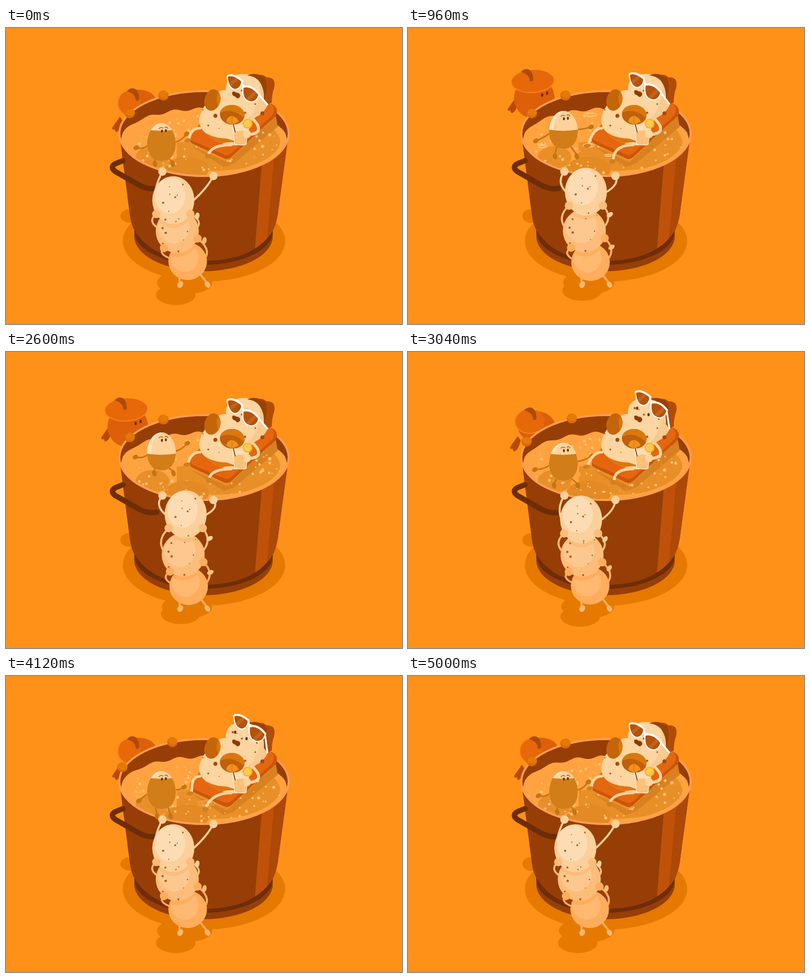
Write an HTML page with a canvas that moves like this. It is 800 px wide and 600 px high and loops after 5.04 s.

```html
<!DOCTYPE html>
<html lang="en">
<head>
<meta charset="utf-8">
<title>Soup spa</title>
<style>
html, body { margin: 0; height: 100%; overflow: hidden; background: #ff9118; }
canvas { display: block; width: 800px; height: 600px; }
</style>
</head>
<body>
<canvas id="stage" width="800" height="600"></canvas>
<script>
const c = document.getElementById('stage').getContext('2d');
const LOOP = 5040, STROKE = LOOP / 2, TAU = Math.PI * 2;
const BROWN = '#963e05', DARK = '#6e2d08', SHADE = '#e67a00', CREAM = '#fcd5a0';
c.lineCap = c.lineJoin = 'round';

const mix = (a, b, k) => a + (b - a) * k;
const ease = (t, from, to) => {
  const k = Math.min(1, Math.max(0, (t - from) / (to - from)));
  return k * k * (3 - 2 * k);
};
// Rises to 1 and falls back to 0
const pulse = (t, rise, top, fall, end) => ease(t, rise, top) - ease(t, fall, end);

function oval(x, y, rx, ry, color, turn = 0) {
  c.beginPath();
  c.ellipse(x, y, rx, ry, turn, 0, TAU);
  if (color) { c.fillStyle = color; c.fill(); }
}
const dot = (x, y, r, color) => oval(x, y, r, r, color);
function shape(d, color) {
  c.fillStyle = color;
  c.fill(new Path2D(d));
}
function line(d, color, width) {
  c.strokeStyle = color;
  c.lineWidth = width;
  c.stroke(new Path2D(d));
}
function within(d, draw) {
  c.save();
  c.clip(new Path2D(d));
  draw();
  c.restore();
}
function random(seed) {
  return () => (seed = seed * 16807 % 2147483647) / 2147483647;
}
function freckles(x, y, rx, ry, count, seed) {
  const rand = random(seed * 7919);
  for (let i = 0; i < count; i++) {
    const a = i * 2.4 + seed, r = .45 + .5 * rand();
    dot(x + rx * r * Math.cos(a), y + ry * r * Math.sin(a), 1 + 1.6 * rand() ** 2, '#b05a18');
  }
}

const rand = random(7);
const bubbles = Array.from({ length: 190 }, () => {
  const a = rand() * TAU, r = Math.sqrt(rand());
  return {
    x: 398 + 155 * r * Math.cos(a), y: 238 + 60 * r * Math.sin(a),
    size: 1 + 2.4 * rand(), phase: rand(), rate: 2 + Math.floor(rand() * 4)
  };
});

// Point on a paddling orbit; side is -1 for left and 1 for right
function paddle(x, y, side, r, swing) {
  return [x + side * r * Math.sin(swing), y - r * .9 * Math.cos(swing)];
}

function shadows(up) {
  oval(400, 432, 164, 82, SHADE);
  oval(251, 381, 20, 14, SHADE);
  oval(mix(361, 366, up), 516, mix(56, 51, up), 24, SHADE);
  oval(mix(343, 353, up), mix(541, 531, up), 40, 20.5, SHADE);
}

function pumpkin(t) {
  const up = pulse(t, 300, 720, 2800, 3200) + .25 * pulse(t, 300, 720, 720, 960);
  const sway = 9 * pulse(t, 960, 2600, 2850, 3200);
  const m = (a, b) => mix(a, b, up);
  c.save();
  c.translate(-sway, sway);
  c.save();
  c.translate(m(224, 211), m(196, 158));
  shape('M6 -16Q-4 -2 -10 7Q-8 12 -4 9Q-4 16 1 14Q8 10 12 -8Z', '#b84a08');
  c.restore();
  oval(m(268, 255), m(150, 142), m(36, 41), m(25, 42), '#dd5f0a');
  const lid = [m(249, 252), m(152, 108), m(23, 43), m(25, 23), m(0, -.06)];
  oval(...lid.slice(0, 4), '#e66808', lid[4]);
  c.strokeStyle = '#f8841c';
  c.lineWidth = 2;
  c.beginPath();
  c.ellipse(...lid, m(1.6, 0), m(4.6, Math.PI));
  c.stroke();
  c.translate(m(16, 0), m(39, 0));
  shape('M228 89Q235 81 244 84Q253 89 253 106Q249 111 246 107Q246 94 228 89Z', '#ae4a07');
  if (up > .6) {
    const open = Math.abs(t - 1720) > 80 ? 3.4 : .9;
    oval(271, 136, 2.4, open, DARK);
    oval(281, 132, 2.4, open, DARK);
  }
  c.restore();
}

function pot() {
  oval(399, 422, 140, 71, BROWN);
  oval(399, 412, 140, 68, DARK);
  const body = 'M229 214L250 378Q253 402 262 414Q300 472 399 472Q498 472 537 414Q545 402 549 378L571 214Z';
  shape(body, BROWN);
  within(body, () => {
    shape('M518 260L503 446H526L543 250Z', '#bf5208');
    shape('M543 250L526 446H600V200Z', '#ad4906');
  });
  line('M236 269L221 275Q209 282 221 291L268 318Q286 328 304 325', DARK, 11);
}

function ripple(x, y, width, k) {
  if (k <= 0 || k >= 1) return;
  c.globalAlpha = Math.min(1, 2 * (1 - k));
  c.strokeStyle = '#ffcf8c';
  c.lineWidth = 1.2;
  for (const w of [width, width * .6]) {
    oval(x, y, w * Math.sqrt(k), w * .32 * Math.sqrt(k));
    c.stroke();
  }
  c.globalAlpha = 1;
}

function soup(t, swing, limbs) {
  oval(400, 214, 171, 86, BROWN);
  within('M230 214A170 86 0 0 1 570 214A170 86 0 0 1 230 214Z', () => {
    c.beginPath();
    for (let x = 232; x <= 568; x += 4) {
      const arc = Math.sqrt(1 - ((x - 400) / 168) ** 2);
      const wave = x < 405 ? 3 * arc * Math.sin(x * .125 + 1.5 * Math.sin(swing)) : 0;
      c.lineTo(x, 226 - 62 * arc + wave);
    }
    c.lineTo(580, 310);
    c.lineTo(220, 310);
    c.fillStyle = '#ffa340';
    c.fill();
    shape('M345 232Q420 226 470 215L535 200Q560 222 552 240Q538 268 480 284Q410 298 345 276Z', '#e98f28');
    oval(296, 262, 34, 23, '#e98f28');
    oval(365, 286, 45, 25, '#e48a24');
    shape('M373 238L447 272L545 178L549 200L460 275L440 282Z', '#d98120');
    for (const b of bubbles) {
      const life = (t / LOOP * b.rate + b.phase) % 1;
      const r = b.size * Math.min(1, 2 * Math.sin(life * TAU));
      if (r > 0) dot(b.x, b.y - life * 4, r, '#ffc272');
    }
    limbs.forEach(([x, y], i) => ripple(x, y, 20, (t / STROKE % 1 - .2 - .04 * i) / .42));
  });
  c.strokeStyle = '#ff9d55';
  c.lineWidth = 4;
  oval(400, 214, 171, 86);
  c.stroke();
}

function pumpkinHands(t) {
  const out = pulse(t, 2840, 3150, 4450, 4900);
  for (const [x, y] of [[250 - 15 * out, 173 + 12 * out], [318 + 18 * out, 137 - 3 * out]]) {
    oval(x, y, 10.5, 10, '#e0680a');
    oval(x + 1, y - 2, 9.5, 7, '#e27a08');
  }
}

function egg(t, swing) {
  const top = 193 - 25 * pulse(t, 350, 760, 2760, 3200) - 5 * ease(t, 960, 2600) + 5 * ease(t, 2760, 3200);
  const x = 314, y = top + 38, limb = '#c57512';
  for (const side of [-1, 1]) {
    const [hx, hy] = paddle(x + 51 * side, y + 4 - 14 * side, side, 7, swing);
    const [fx, fy] = paddle(x + 5 + 18 * side, y + 50, side, 6, swing);
    line(`M${x + 26 * side} ${y + 3 - side * 3}Q${x + 38 * side} ${y + 8 - side * 8} ${hx} ${hy}`, limb, 3);
    line(`M${x + 13 * side} ${y + 32}L${fx} ${fy - 3}`, limb, 3);
    oval(hx, hy, 6, 4.5, limb, -.5);
    oval(fx, fy, 4.5, 6.5, limb, -.25);
  }
  within(`M${x} ${top}c18 0 29 22 29 42c0 22 -12 35 -29 35s-29 -13 -29 -35c0 -20 11 -42 29 -42Z`, () => {
    dot(x, y, 50, '#ffe6c6');
    oval(x + 8, top + 36, 29, 36, '#ffd29b');
    shape(`M270 203Q${x} 214 358 203V300H270Z`, '#d17d18');
  });
  oval(x + 1, top + 16, 2, 3, DARK);
  oval(x + 9, top + 15, 2, 3, DARK);
  line(`M${x - 5} ${top + 11}q4 -4 8 -1m4 -1q4 -3 6 2`, '#a85a10', 1.5);
}

function bather(t, feet) {
  const bob = -4 * pulse(t, 500, 960, 1720, 2600);
  const raised = pulse(t, 2650, 3100, 4400, 4850);

  // Lounger and hair
  shape('M372 222Q368 230 378 235L440 264Q448 268 456 261L545 178Q551 168 543 158L530 150Z', '#cb5508');
  shape('M390 196L372 218Q369 225 378 229L440 256Q448 260 456 253L538 177Q547 162 533 152L515 150Z', '#e4670f');
  shape('M500 96Q520 92 526 100Q546 99 542 120Q537 134 537 151L520 158Z', '#b14c07');

  const [[lx, ly], [rx, ry]] = feet;
  line(`M392 203Q374 203 ${lx + 2} ${ly - 6}`, CREAM, 5.5);
  line(`M455 237Q418 237 ${rx + 1} ${ry - 7}`, CREAM, 5.5);
  oval(lx - 1, ly - 2, 7, 4, '#d18020', -.2);
  oval(rx - 1, ry - 1, 6, 5, '#d18020', -.2);

  const body = 'M446 112Q450 98 470 94Q500 90 516 108Q523 122 521 146L528 157Q522 169 511 177Q497 184 492 194Q490 234 465 238Q425 238 399 209Q387 196 392 177Q398 157 412 147Q430 123 444 126Q444 118 446 112Z';
  shape(body, CREAM);
  within(body, () => {
    shape('M506 95Q518 118 511 146Q500 180 478 190L550 240V85Z', '#f8ca90');
    shape('M384 190Q400 223 446 224L472 233L450 250H380Z', '#de7510');
    shape('M425 240Q442 228 470 233L480 245Z', CREAM);
    freckles(455, 155, 68, 66, 16, 5);
  });
  shape('M487 96Q505 88 523 101Q531 118 521 149Q523 120 509 105Q500 97 487 96Z', '#9b4105');
  dot(423, 178, 4, '#a44a0b');
  dot(518, 173, 4, '#a44a0b');

  // Swimsuit
  oval(417, 146, 16, 22, '#c4650a', .25);
  within('M433 124Q418 140 433 168H450V124Z', () => oval(417, 146, 16, 22, '#db780d', .25));
  oval(457, 176, 25, 20, '#c0600a', .1);
  within('M432 150V172Q460 160 482 184V150Z', () => oval(457, 176, 25, 20, '#db780d', .1));

  // Face
  c.save();
  c.translate(0, bob * .7);
  shape('M457 130Q461 127 465 131Q474 131 473 139Q468 146 463 139Q456 138 457 130Z', '#8e3b07');
  oval(463, 114, 2.3, 3.2, DARK);
  oval(486, 127, 2.3, 3.2, DARK);
  c.restore();

  // Sunglasses
  const gx = 13 * raised, gy = mix(bob, -17, raised);
  line(`M${510 + gx} ${134 + gy}L528 ${155 + bob * .3}`, '#fff', 3.5);
  c.save();
  c.translate(gx, gy);
  for (const lens of ['M447 98Q459 91 477 107Q475 123 463 125Q448 122 447 98Z',
    'M479 119Q495 114 511 134Q508 149 496 150Q475 148 479 119Z']) {
    shape(lens, '#b5520c');
    within(lens, () => line('M445 122L472 98M480 154L512 122', '#c4621a', 7));
    line(lens, '#fff', 2.4);
  }
  line('M448 97Q460 92 477 107Q476 113 480 119Q496 115 511 134', '#fff', 4);
  c.restore();

  // Drink
  line('M500 186Q514 200 509 209Q505 215 490 216', CREAM, 6);
  const glass = 'M457 195L462 235Q474 239 485 236L490 197';
  shape(glass, '#fde0b5cc');
  within(glass, () => oval(474, 226, 20, 18, '#fcc078'));
  line(glass, '#fff0d9', 1.3);
  oval(487, 215, 8, 8.5, CREAM);
  line('M459 195L463 211', DARK, 1.6);
  shape('M445 190Q447 179 457 178Q467 181 470 190L456 196Z', '#f0921c');
  line('M457 179L456 195', '#cf6e0c', 1);
  dot(488, 194, 10, '#ffb21f');
  dot(488, 194, 7.5, '#ffc94f');
}

function spud(s, light, above) {
  const { x, y, rx, ry, color } = s;
  oval(x, y, rx, ry, color);
  c.save();
  c.clip();
  oval(x - rx * .15, y - ry * .2, rx * .72, ry * .76, light);
  if (above) oval(above.x, above.y + 8, above.rx, above.ry, color);
  c.restore();
}
function arm(x, y, hand, side, bulge, color) {
  line(`M${x} ${y}Q${(x + hand[0]) / 2 + side * bulge} ${(y + hand[1]) / 2} ${hand.join(' ')}`, color, 4);
}

function tower(up) {
  const m = (a, b) => mix(a, b, up);
  const stack = [
    { x: m(338, 363), y: m(349, 329), rx: 42.5, ry: 48.5, color: '#fbd09a' },
    { x: m(346, 358), y: m(412, 411), rx: 43.5, ry: 44, color: '#fdbd7a' },
    { x: m(367, 369), y: m(473, 475), rx: 39, ry: 38, color: '#ffad5c' }
  ];
  const [high, mid, low] = stack;
  line('M350 502L351 517M390 496L406 517', low.color, 4);
  oval(352, 520, 5.5, 7, '#ffb872', .5);
  oval(407, 520, 5, 7, '#ffb872', -.6);

  // Each one holds on to the one above; the highest holds the rim
  const grips = stack.map((s, i) => [-1, 1].map(side => {
    if (!i) return [367.5 + 51.5 * side, 295.5 + 4.5 * side];
    const above = stack[i - 1], a = Math.PI / 2 - side * .94 - .28 * (i - 1);
    return [above.x + above.rx * Math.cos(a), above.y + above.ry * .98 * Math.sin(a)];
  }));
  stack.forEach((s, i) => [-1, 1].forEach((side, j) =>
    arm(s.x + side * s.rx * .9, s.y - s.ry * (i ? .15 : -.05), grips[i][j], side, i ? 20 : m(8, 22), s.color)));

  spud(low, '#ffb971', mid);
  spud(mid, '#fdc890', high);
  spud(high, '#fddcb4');
  freckles(high.x, high.y, high.rx, high.ry, 6, 2);
  freckles(mid.x, mid.y, mid.rx, mid.ry, 9, 3);
  for (const [dx, dy, r] of [[-7, -12, 1.3], [8, -10, 1.2], [4, -6, 2]]) dot(high.x + dx, high.y + dy, r, '#b6621a');

  grips.forEach((pair, i) => {
    if (i) oval(pair[1][0] + 14, pair[1][1] + m(4, 21), 4.5, 7, stack[i - 1].color, m(.2, 1.1));
    for (const [x, y] of pair) dot(x, y, 8.5, stack[i].color);
  });
}

function frame(now) {
  const t = now % LOOP, swing = t / STROKE * TAU;
  const up = pulse(t, 450, 1120, 2760, 3300);
  const feet = [paddle(368, 236, -1, 7, swing), paddle(409, 267, 1, 7, swing)];
  c.fillStyle = '#ff9118';
  c.fillRect(0, 0, 800, 600);
  shadows(up);
  pumpkin(t);
  pot();
  soup(t, swing, [[368, 176], [365, 238], [272, 240], [405, 258]]);
  pumpkinHands(t);
  egg(t, swing);
  bather(t, feet);
  tower(up);
  requestAnimationFrame(frame);
}
requestAnimationFrame(frame);
</script>
</body>
</html>
```
